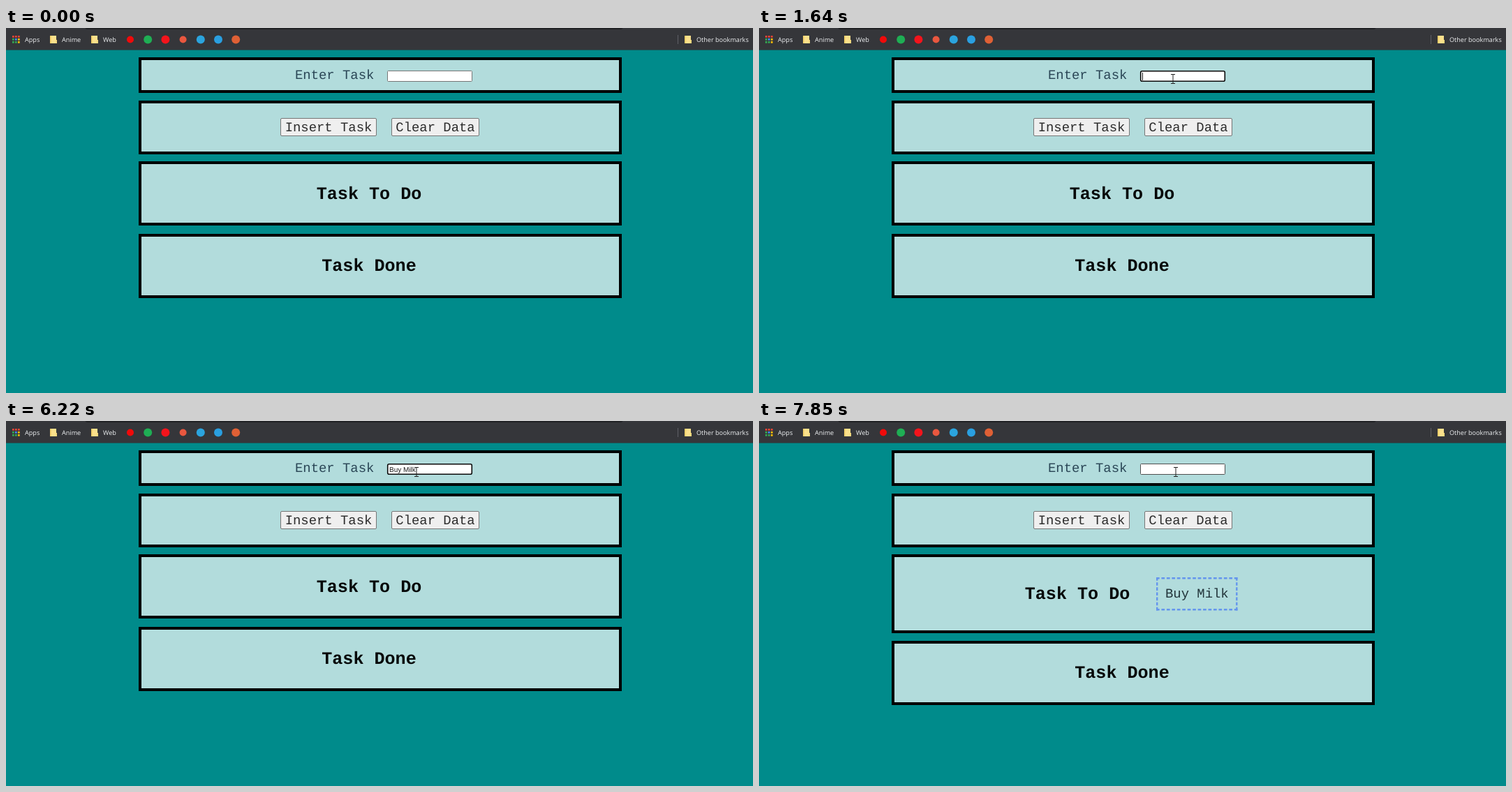
An HTML page with a canvas for the animation above (8 s loop, 1070 px wide and 523 px high).

```html
<!DOCTYPE html>
<html lang="en">
<head>
<meta charset="utf-8">
<title>Task list</title>
<style>
  html, body { margin: 0; width: 100%; height: 100%; overflow: hidden; background: #008b8b; }
  canvas { display: block; }
</style>
</head>
<body>
<canvas id="stage" width="1070" height="523"></canvas>
<script>
const ctx = document.getElementById('stage').getContext('2d');
const LOOP = 8000;
const MONO = '"Liberation Mono", "Courier New", monospace';
const LABEL = '18.9px ' + MONO;
const HEADING = 'bold 25.1px ' + MONO;
const SANS = '10px "Liberation Sans", Arial, sans-serif';
const BAR = '9.1px "Open Sans", "Noto Sans", sans-serif';

const FIELD = { x: 546, y: 61, w: 122, h: 16 };
const INSERT = { x: 393, y: 129, w: 138, h: 26 };
const CLEAR = { x: 552, y: 129, w: 126, h: 26 };

const FOCUS = 1570, PRESS = 6770, ADDED = 7000;
const TASK = 'Buy Milk';
const KEY_TIMES = [3260, 3660, 3960, 4280, 4660, 4880, 5130, 5450];

// Pointer path: time, x, y, and whether the move eases
const PATH = [
  [320, 967, 491], [780, 601, 134], [1090, 590, 78], [1170, 592, 76],
  [1320, 593, 75], [1570, 593, 75], [1640, 593, 73], [6144, 593, 73],
  [6220, 588, 73], [6600, 473, 142, true], [7152.5, 473, 142], [7850, 597, 73, true]
];
const TICK = 77;

function pointerAt(t) {
  if (t < PATH[0][0]) return null;
  const i = PATH.findIndex(p => p[0] > t);
  if (i < 0) {
    const [, x, y] = PATH[PATH.length - 1];
    return { x, y };
  }
  const [t0, x0, y0] = PATH[i - 1];
  const [t1, x1, y1, eased] = PATH[i];
  const n = Math.max(1, Math.round((t1 - t0) / TICK));
  let u = Math.floor((t - t0) / (t1 - t0) * n + 1e-6) / n;
  if (eased) u = u * u * (3 - 2 * u);
  return { x: x0 + (x1 - x0) * u, y: y0 + (y1 - y0) * u };
}

const inside = (p, r) => !!p && p.x >= r.x && p.x < r.x + r.w && p.y >= r.y && p.y <= r.y + r.h;

function rect(x, y, w, h, color) {
  ctx.fillStyle = color;
  ctx.fillRect(x, y, w, h);
}

function text(str, x, y, font, color) {
  ctx.font = font;
  ctx.fillStyle = color;
  ctx.fillText(str, x, y);
}

function dot(x, y, r, color) {
  ctx.fillStyle = color;
  ctx.beginPath();
  ctx.arc(x, y, r, 0, Math.PI * 2);
  ctx.fill();
}

function roundBox(r, inset, radius, fill, stroke, line) {
  ctx.beginPath();
  ctx.roundRect(r.x + inset, r.y + inset, r.w - 2 * inset, r.h - 2 * inset, radius);
  ctx.fillStyle = fill;
  ctx.fill();
  ctx.lineWidth = line;
  ctx.strokeStyle = stroke;
  ctx.stroke();
}

function panel(y, h) {
  rect(190, y, 692, h, '#000');
  rect(194, y + 4, 684, h - 8, '#b2dcdc');
}

function folder(x) {
  rect(x, 11, 9, 11, '#fbe08c');
  rect(x, 11, 2, 11, '#f3d16c');
  rect(x + 8, 17, 2, 5, '#f6d97e');
}

function bookmarks() {
  rect(0, 0, 1070, 31, '#35363a');
  rect(0, 31, 1070, 1, '#1d5658');
  ctx.fillStyle = '#202124';
  ctx.beginPath();
  ctx.roundRect(113, -6, 771, 8, 4);
  ctx.fill();

  const grid = ['#ea4335', '#ea4335', '#ea4335', '#34a853', '#4285f4', '#fbbc05', '#34a853', '#34a853', '#fbbc05'];
  grid.forEach((c, i) => rect(9 + i % 3 * 4, 11 + Math.floor(i / 3) * 4, 2.7, 2.7, c));
  folder(63);
  folder(122);
  folder(972);
  const ink = '#eef0f2';
  text('Apps', 27, 20, BAR, ink);
  text('Anime', 80, 20, BAR, ink);
  text('Web', 139, 20, BAR, ink);
  text('Other bookmarks', 989, 20, BAR, ink);
  rect(962, 10, 1, 13, '#606166');

  const sites = ['#f00a0a', '#1fae54', '#f4141c', '#e9573f', '#2ba4de', '#2a9fe0', '#df6035'];
  sites.forEach((c, i) => dot(178 + i * 25.2, 16.5, i === 0 || i === 3 ? 5 : 6, c));
}

function button(r, label, hover, pressed) {
  if (hover) {
    const [lit, dark] = pressed ? ['#0c0c10', '#6c6c72'] : ['#6c6c72', '#0c0c10'];
    rect(r.x, r.y, r.w, r.h, dark);
    rect(r.x, r.y, r.w - 1.5, r.h - 1.5, lit);
    rect(r.x + 1.5, r.y + 1.5, r.w - 3, r.h - 3, '#483d8b');
  } else {
    roundBox(r, 0.5, 1.5, '#efefef', '#767676', 1);
  }
  const x = r.x + r.w / 2 - label.length * 11.34 / 2;
  text(label, x, 148, LABEL, hover ? '#f4f2fa' : '#2c2c2c');
}

function field(t, hover) {
  const focused = t >= FOCUS && t < PRESS;
  if (focused) roundBox(FIELD, 0.7, 2, '#fff', '#0a0a0a', 1.6);
  else roundBox(FIELD, 0.5, 1, '#fff', hover ? '#4f4f4f' : '#767676', 1);

  const count = KEY_TIMES.filter(k => t >= k).length;
  const typed = t < ADDED ? TASK.slice(0, count) : '';
  text(typed, 549, 72.5, SANS, '#1c1c1c');

  const since = count ? KEY_TIMES[count - 1] - 80 : FOCUS - 10;
  if (focused && Math.floor((t - since) / 545) % 2 === 0) {
    rect(Math.floor(549 + ctx.measureText(typed).width), 64, 1, 11, '#222');
  }
}

// Dashes fitted so that each side begins and ends with a full dash
function dashedSide(x0, y0, x1, y1) {
  const len = Math.hypot(x1 - x0, y1 - y0);
  const dash = 4.7;
  const n = Math.round((len - dash) / (dash + 2.6));
  ctx.setLineDash([dash, (len - dash) / n - dash]);
  ctx.beginPath();
  ctx.moveTo(x0, y0);
  ctx.lineTo(x1, y1);
  ctx.stroke();
}

function taskItem() {
  const l = 569, r = 685.5, t = 224, b = 271.5, h = 1.2;
  ctx.strokeStyle = '#6495ed';
  ctx.lineWidth = 2.4;
  dashedSide(l, t + h, r, t + h);
  dashedSide(l, b - h, r, b - h);
  dashedSide(l + h, t, l + h, b);
  dashedSide(r - h, t, r - h, b);
  ctx.setLineDash([]);
  text(TASK, 582, 253, LABEL, '#22343a');
}

function arrow(x, y) {
  ctx.beginPath();
  [[0, 0], [0, 13], [3, 10.3], [5, 15], [7.2, 14], [5.2, 9.6], [9.2, 9.4]]
    .forEach(([dx, dy]) => ctx.lineTo(x + dx, y + dy));
  ctx.closePath();
  ctx.fillStyle = '#fff';
  ctx.fill();
  ctx.strokeStyle = '#111';
  ctx.lineWidth = 0.8;
  ctx.stroke();
}

function beam(x, y) {
  x = Math.round(x);
  y = Math.round(y);
  rect(x - 0.5, y - 6, 1, 13, '#222');
  rect(x - 3, y - 7, 6, 1, '#222');
  rect(x - 3, y + 6, 6, 1, '#222');
}

function draw(t) {
  const p = pointerAt(t);
  const overField = inside(p, FIELD);
  const added = t >= ADDED;
  const drop = added ? 20 : 0;

  rect(0, 0, 1070, 523, '#008b8b');
  bookmarks();

  panel(42, 51);
  text('Enter Task', 414, 73, LABEL, '#2a4656');
  field(t, overField);

  panel(104, 77);
  button(INSERT, 'Insert Task', inside(p, INSERT), t >= PRESS && !added);
  button(CLEAR, 'Clear Data', inside(p, CLEAR), false);

  panel(191, added ? 113 : 92);
  text('Task To Do', added ? 380.7 : 444.7, added ? 255 : 245, HEADING, '#060808');
  if (added) taskItem();

  panel(295 + drop, 92);
  text('Task Done', 452.2, 348 + drop, HEADING, '#060808');

  if (p) (overField ? beam : arrow)(p.x, p.y);
}

ctx.textRendering = 'geometricPrecision';
const start = performance.now();
function loop() {
  draw((performance.now() - start) % LOOP);
  requestAnimationFrame(loop);
}
loop();
</script>
</body>
</html>
```
